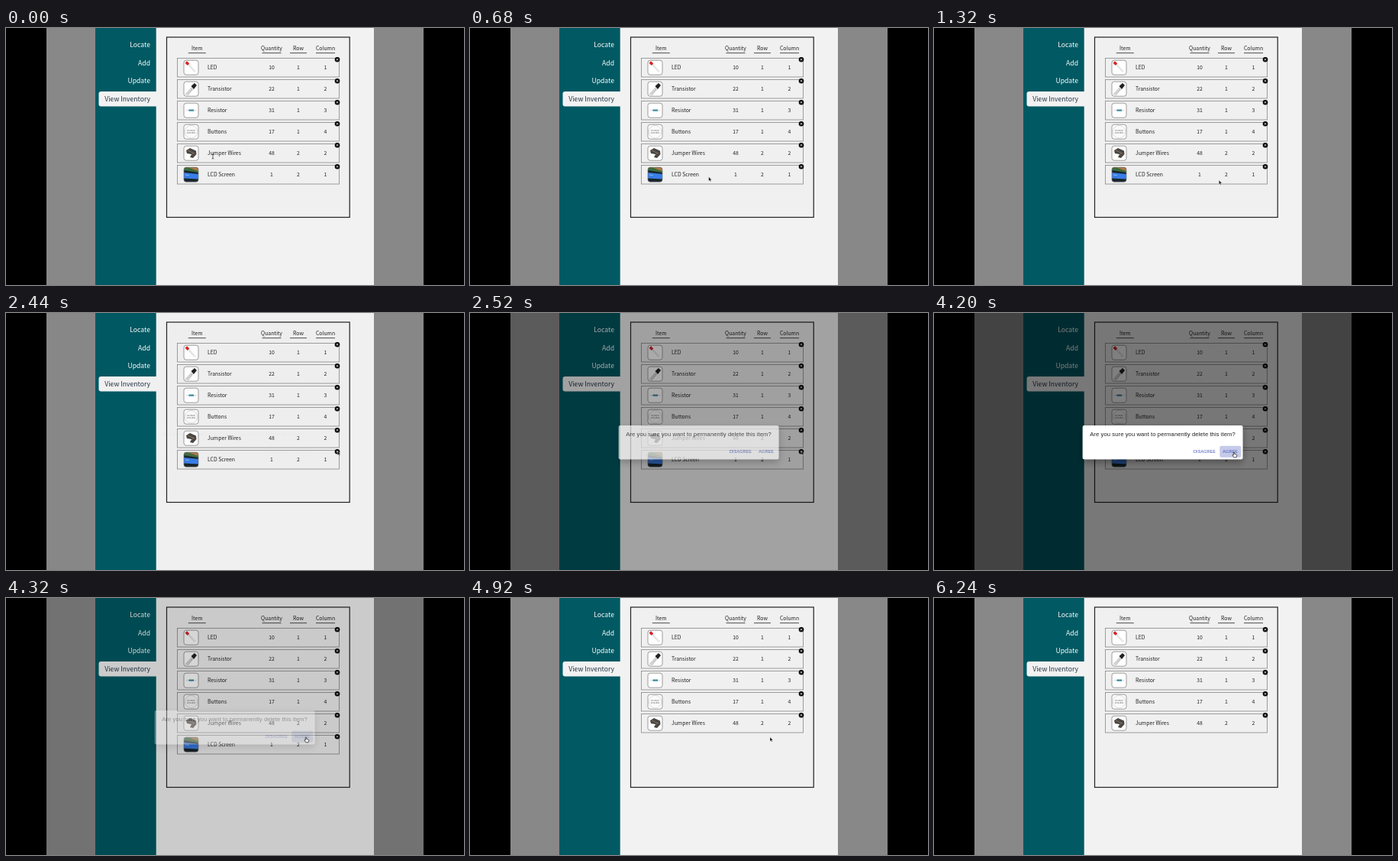
These frames come from a looping animation (600x336 px, 6280 ms). An HTML page:

```html
<!DOCTYPE html>
<html lang="en">
<head>
<meta charset="utf-8">
<title>Inventory</title>
<style>
html, body { margin: 0; width: 100%; height: 100%; overflow: hidden; background: #000; }
svg { display: block; width: 600px; height: 336px; }
text { font-family: "Noto Sans CJK JP", "Noto Sans CJK SC", "Noto Sans", sans-serif; font-size: 6.85px; fill: #222; }
.mid { text-anchor: middle; }
.nav { font-size: 8.65px; text-anchor: end; }
#dialog text { font-family: "Liberation Sans", Arial, sans-serif; }
#dialog .title { font-size: 7.7px; letter-spacing: .0075em; }
#dialog .button { font-size: 5.4px; letter-spacing: .02857em; fill: #3f51b5; }
</style>
</head>
<body>
<svg viewBox="0 0 600 336" xmlns="http://www.w3.org/2000/svg">
  <defs>
    <filter id="shadow" x="-10%" y="-30%" width="120%" height="180%">
      <feDropShadow dx="0" dy="4" stdDeviation="5" flood-opacity=".35"/>
    </filter>
    <clipPath id="thumb"><rect x="233" y="3.2" width="19" height="19" rx="3"/></clipPath>
  </defs>
  <rect width="600" height="336"/>
  <rect x="53" width="494" height="336" fill="#888"/>
  <rect x="117" width="365" height="336" fill="#f2f2f2"/>
  <rect x="117" width="79.7" height="336" fill="#005963"/>
  <path d="M197 83H124.500a3 3 0 0 0-3 3v13.500a3 3 0 0 0 3 3H197z" fill="#f2f2f2"/>
  <g id="nav"></g>
  <rect x="210.500" y="12" width="239.700" height="235.500" fill="#f0f0f0" stroke="#222" stroke-width="1.200"/>
  <g id="table"></g>
  <rect id="dim" x="53" width="494" height="336"/>
  <g id="dialog">
    <rect x="194.700" y="147" width="209.800" height="44.300" rx="2" fill="#fff" filter="url(#shadow)"/>
    <text class="title" x="204.200" y="161.200">Are you sure you want to permanently delete this item?</text>
    <rect id="hover" x="374.300" y="173.800" width="28" height="15" rx="2" fill="#3f51b5"/>
    <text class="button" x="340" y="183.100">DISAGREE</text>
    <text class="button" x="378.300" y="183.100">AGREE</text>
  </g>
  <g id="cursor">
    <path id="arrow" d="M0 0V5.600L1.300 4.400L2.200 6.400L3.100 6L2.200 4.100H4z" fill="#111" stroke="#fff" stroke-width=".4"/>
    <path id="beam" d="M-1.300-3Q0-3 0-2.200Q0-3 1.300-3M0-2.200V2.200M-1.300 3Q0 3 0 2.200Q0 3 1.300 3" fill="none" stroke="#222" stroke-width=".7"/>
    <path id="hand" d="M-.7.500Q0-.5.600.500V2.500L3.300 3.200Q4 3.500 3.700 4.700L3 7H-.2L-2 4.300Q-2.200 3.200-.7 4z" fill="#fff" stroke="#111" stroke-width=".7"/>
  </g>
</svg>
<script>
const LOOP = 6280, OPEN = 2425, CLOSE = 4236, REMOVE = 4440, LEAVE = 5760;
const $ = id => document.getElementById(id);

const line = (d, color, width) => `<path d="${d}" fill="none" stroke="${color}" stroke-width="${width}"/>`;
const label = (x, y, s, cls = "") => `<text class="${cls}" x="${x}" y="${y}">${s}</text>`;

// Thumbnails share the local coordinates of a table row
const pictures = {
  led: line("M239 8L248.500 18M238.500 9L247 18.500", "#c5c5c5", .7) +
    line("M235.800 5.600L239 8.800", "#d8232a", 3.6),
  transistor: line("M235 20L243.500 10.500M236.500 20.500L244.500 11.500M238 21L245 12.500", "#888", .7) +
    `<path d="M242.500 9L247 5L250 8L246 13z" fill="#222"/>`,
  resistor: line("M236 12.700H249.500", "#bbb", .6) + line("M239.500 12.700H246", "#3c8ba6", 2.2),
  buttons: `<circle cx="242.500" cy="12.700" r="8.300" fill="#fafafa" stroke="#bbb" stroke-width=".5"/>
    <g style="font-weight:500">
    <text class="mid" x="242.500" y="12.300" style="font-size:2.300px;fill:#555">NO IMAGE</text>
    <text class="mid" x="242.500" y="15" style="font-size:2.300px;fill:#555">AVAILABLE</text></g>`,
  wires: `<path d="M236 9L241 6L249 9.500L249.500 14L245 19L241 18L243 14L237 13z" fill="#4b4641"/>` +
    line("M238 9L247 13M242 16L246 12", "#8c8175", .8),
  screen: `<path d="M233 3h19.500v20h-19.500z" fill="#17252b"/>
    <path d="M233 3h8l11 4v3l-19-3z" fill="#3f6b3c"/>
    <path d="M238 3h10l4 2v3z" fill="#b87841"/>
    <path d="M233 10l19 2v6.500l-19-1z" fill="#397ee8"/>` + line("M235 13L240 13.500", "#9bc5ff", .8)
};

const items = [
  ["LED", "led", 10, 1, 1],
  ["Transistor", "transistor", 22, 1, 2],
  ["Resistor", "resistor", 31, 1, 3],
  ["Buttons", "buttons", 17, 1, 4],
  ["Jumper Wires", "wires", 48, 2, 2],
  ["LCD Screen", "screen", 1, 2, 1]
];
const columns = [348, 383, 418.5];

function row([name, picture, ...values], i) {
  return `<g id="row${i}" transform="translate(0 ${39 + 28 * i})">
    <rect x="224.500" y=".5" width="212" height="24.500" fill="#f0f0f0" stroke="#888" stroke-width=".8"/>
    <rect x="233" y="3.200" width="19" height="19" rx="3" fill="#fff"/>
    <g clip-path="url(#thumb)">${pictures[picture]}</g>
    <rect x="233" y="3.200" width="19" height="19" rx="3" fill="none" stroke="#777" stroke-width=".7"/>
    ${label(264, 15.2, name)}
    ${values.map((v, k) => label(columns[k], 15.2, v, "mid")).join("")}
    <circle cx="434" cy="2.300" r="3.300" fill="#050505"/>
    ${line("M432.800 1.100l2.400 2.400m0-2.400l-2.400 2.400", "#fff", .8)}
  </g>`;
}

const heads = [["Item", 250.3, 11.5], ["Quantity", 348, 12.5], ["Row", 383, 11], ["Column", 418.5, 12.5]];
$("table").innerHTML = heads.map(([s, x, half]) =>
  label(x, 29.3, s, "mid") + line(`M${x - half} 32.700H${x + half}`, "#222", .8)).join("") +
  items.map(row).join("");

$("nav").innerHTML = ["Locate", "Add", "Update", "View Inventory"].map((s, i) =>
  `<text class="nav" x="189" y="${24.8 + 23.8 * i}" style="fill:${i < 3 ? "#fff" : "#234"}">${s}</text>`).join("");

const path = [
  [0, 271, 168], [80, 271, 168], [640, 312, 194.5], [1280, 372.5, 199], [1360, 374, 198.8],
  [1920, 436, 183], [2360, 434.5, 180.5], [2640, 434, 180.5], [3120, 394, 182.5],
  [4160, 393, 181.8], [5160, 393, 181.8], [LEAVE, 524, 184]
];

function cursorAt(t) {
  const i = Math.max(1, path.findIndex(p => p[0] >= t));
  const [t0, x0, y0] = path[i - 1], [t1, x1, y1] = path[i];
  const k = (t - t0) / (t1 - t0), e = k * k * (3 - 2 * k);
  return [x0 + (x1 - x0) * e, y0 + (y1 - y0) * e];
}

// cubic-bezier(.4, 0, .2, 1), solved by bisection
function ease(k) {
  k = Math.min(1, Math.max(0, k));
  let a = 0, b = 1;
  for (let n = 0; n < 20; n++) {
    const u = (a + b) / 2, v = 1 - u;
    if (1.2 * v * v * u + .6 * v * u * u + u * u * u < k) a = u; else b = u;
  }
  return a * a * (3 - 2 * a);
}

const show = (id, on) => $(id).setAttribute("display", on ? "inline" : "none");

function draw(t) {
  const open = ease((t - OPEN) / 225) * (1 - ease((t - CLOSE) / 195));
  $("dim").setAttribute("opacity", open / 2);
  $("dialog").setAttribute("opacity", open);
  show("dialog", open > .001);
  show("row5", t < REMOVE);

  const overAgree = t > 3040 && t < REMOVE;
  $("hover").setAttribute("opacity", !overAgree ? 0 : t > 4180 ? .3 : .04);

  show("cursor", t < LEAVE);
  if (t < LEAVE) $("cursor").setAttribute("transform", `translate(${cursorAt(t)})`);
  show("beam", t < 120);
  show("hand", overAgree);
  show("arrow", t >= 120 && !overAgree);
}

const start = performance.now();
function tick() {
  draw((performance.now() - start) % LOOP);
  requestAnimationFrame(tick);
}
draw(0);
requestAnimationFrame(tick);
</script>
</body>
</html>
```
